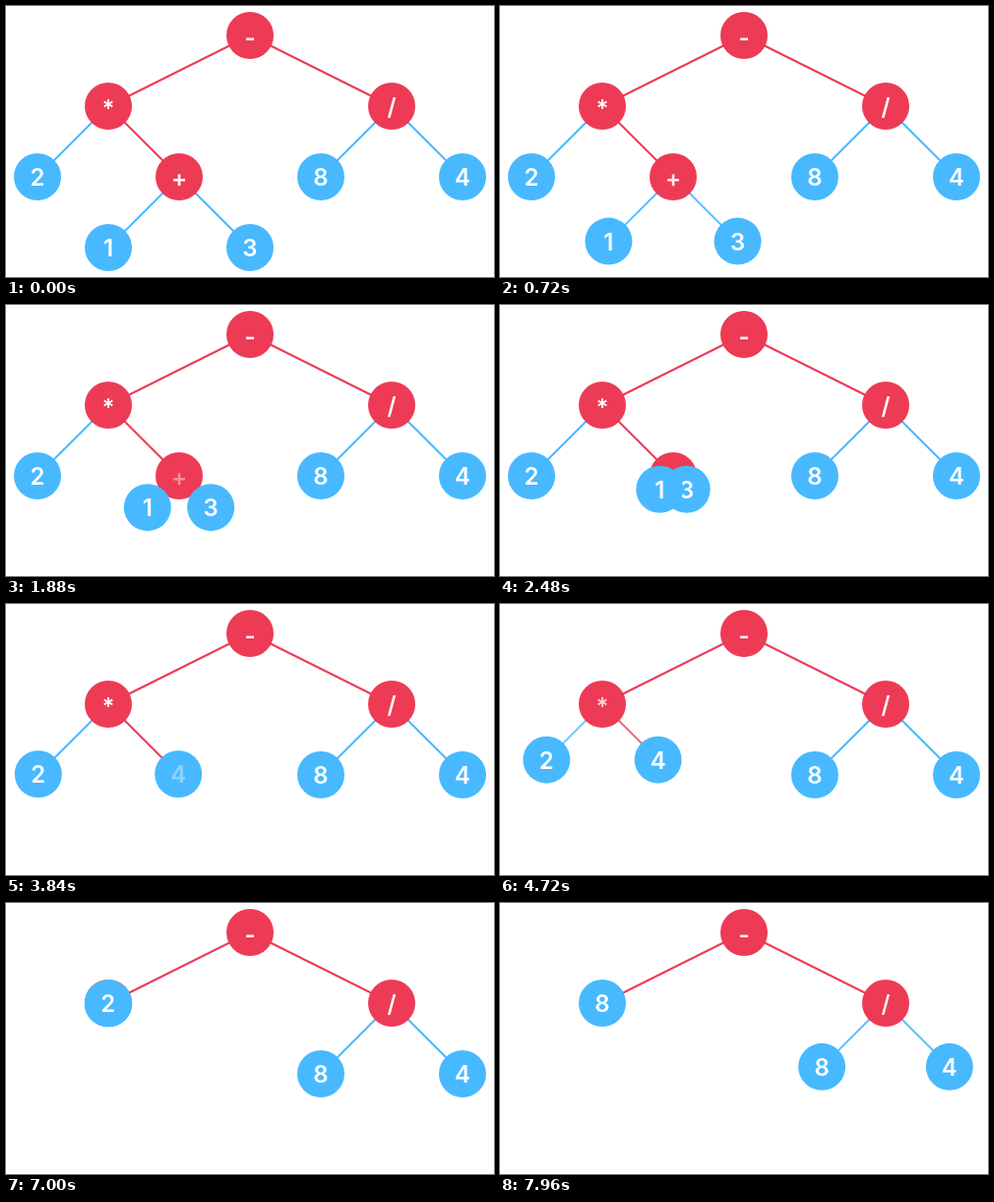
Write an HTML page with a canvas that moves like this. It is 496 by 276 pixels and loops after 8 s.

```html
<!DOCTYPE html>
<html lang="en">
<head>
<meta charset="utf-8">
<title>Expression tree</title>
<style>
html, body { margin: 0; width: 100%; height: 100%; overflow: hidden; background: #fff; }
canvas { display: block; width: 496px; height: 276px; }
</style>
</head>
<body>
<canvas id="stage"></canvas>
<script>
const W = 496, H = 276, R = 24;
const LOOP = 8000, STEP = 3600, LEAD = 30, REVEAL = 720;
const RED = '#ed3b56', BLUE = '#48b9ff';
const NUDGE = { '-': 1.5, '*': 2, '+': 0.5 };

const canvas = document.getElementById('stage');
const ctx = canvas.getContext('2d');
const dpr = window.devicePixelRatio || 1;
canvas.width = W * dpr;
canvas.height = H * dpr;

const leaf = (label, x, y) => ({ label, x, y, kids: [], color: BLUE });
const op = (label, x, y, result, step, ...kids) =>
  ({ label, x, y, result, step, kids, color: RED });

const tree = op('-', 248, 30, '6', 3,
  op('*', 104, 102, '8', 1,
    leaf('2', 32, 174),
    op('+', 176, 174, '4', 0, leaf('1', 104, 246), leaf('3', 248, 246))),
  op('/', 392, 102, '2', 2, leaf('8', 320, 174), leaf('4', 464, 174)));

// Cubic ease-in-out with control points (.42, 0) and (.58, 1).
function ease(u) {
  if (u <= 0 || u >= 1) return u <= 0 ? 0 : 1;
  let lo = 0, hi = 1, s = u;
  for (let i = 0; i < 24; i++) {
    s = (lo + hi) / 2;
    const x = 1.26 * s * (1 - s) * (1 - s) + 1.74 * s * s * (1 - s) + s * s * s;
    if (x < u) lo = s; else hi = s;
  }
  return s * s * (3 - 2 * s);
}

function drawEdge(a, b, color, alpha) {
  ctx.globalAlpha = alpha;
  ctx.strokeStyle = color;
  ctx.lineWidth = 2;
  ctx.beginPath();
  ctx.moveTo(a.x, a.y);
  ctx.lineTo(b.x, b.y);
  ctx.stroke();
  ctx.globalAlpha = 1;
}

function drawNode(x, y, label, color, alpha) {
  ctx.fillStyle = color;
  ctx.beginPath();
  ctx.arc(x, y, R, 0, Math.PI * 2);
  ctx.fill();
  ctx.globalAlpha = alpha;
  ctx.fillStyle = '#fff';
  ctx.fillText(label, x, y + 9 + (NUDGE[label] || 0));
  ctx.globalAlpha = 1;
}

// Draws a subtree at a position; children merge into their operator.
function drawTree(node, x, y, clock) {
  const local = clock - node.step * STEP;
  if (!node.kids.length) return drawNode(x, y, node.label, BLUE, 1);
  if (local >= STEP) {
    return drawNode(x, y, node.result, BLUE, Math.min(1, (local - STEP) / REVEAL));
  }
  const p = ease(local / STEP);
  const spots = node.kids.map(k => ({
    x: k.x + (x - k.x) * p,
    y: k.y + (y - k.y) * p
  }));
  node.kids.forEach((k, i) => drawEdge({ x, y }, spots[i], k.color, 1 - p));
  drawNode(x, y, node.label, RED, 1 - p);
  for (let i = node.kids.length - 1; i >= 0; i--) {
    drawTree(node.kids[i], spots[i].x, spots[i].y, clock);
  }
}

function render(t) {
  ctx.setTransform(dpr, 0, 0, dpr, 0, 0);
  ctx.fillStyle = '#fff';
  ctx.fillRect(0, 0, W, H);
  ctx.font = '600 24px Inter, sans-serif';
  ctx.textAlign = 'center';
  ctx.textBaseline = 'alphabetic';
  drawTree(tree, tree.x, tree.y, t % LOOP + LEAD);
}

const start = performance.now();
function tick() {
  render(performance.now() - start);
  requestAnimationFrame(tick);
}
tick();
</script>
</body>
</html>
```
